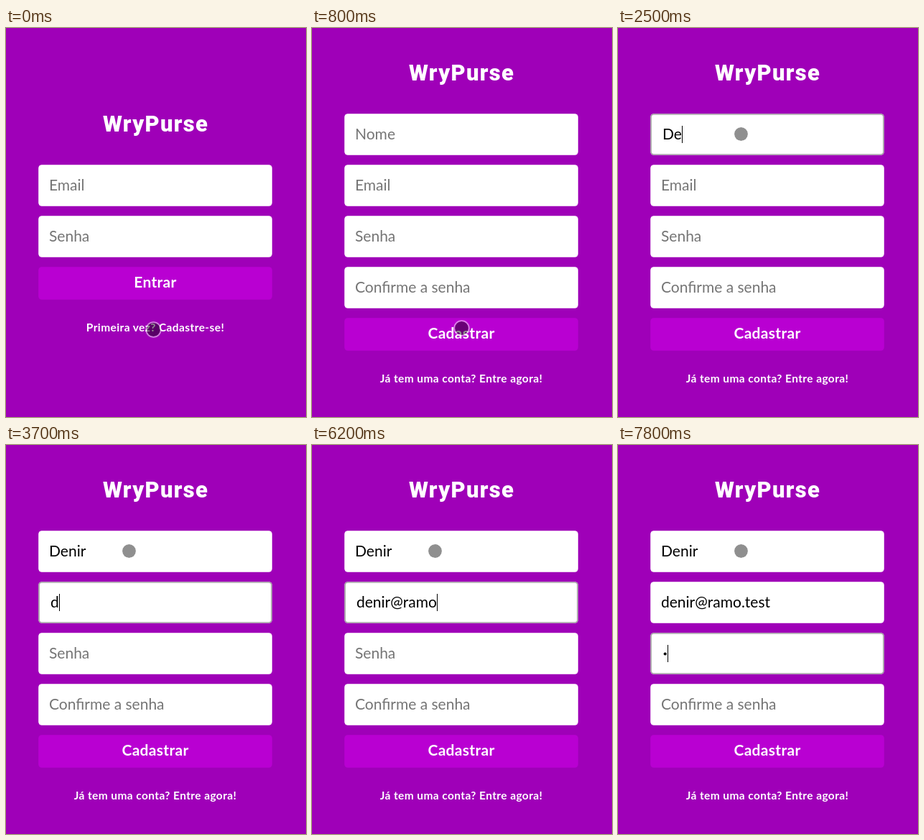
An HTML page that plays this animation: 418x541 px, repeating every 8 s.

```html
<!DOCTYPE html>
<html lang="pt">
<head>
<meta charset="utf-8">
<title>Cadastro</title>
<style>
  html, body { margin: 0; width: 100%; height: 100%; overflow: hidden; background: #9f00b8; }
  svg { display: block; width: 418px; height: 541px; }
  text { font-family: Lato, sans-serif; white-space: pre; }
  .field { font-size: 21px; }
  .button, .link, .brand { fill: #fff; text-anchor: middle; font-weight: 700; }
  .button { font-size: 21px; letter-spacing: .3px; }
  .link { font-size: 15.5px; letter-spacing: .4px; }
  .brand { font: 900 31px Roboto, sans-serif; letter-spacing: 1.3px; }
</style>
</head>
<body>
<svg id="stage" viewBox="0 0 418 541"></svg>
<script>
const LOOP = 8000, STEP = 100;
const LEFT = 45, WIDTH = 326, PITCH = 71, MIDDLE = 208;
const stage = document.getElementById('stage');

function add(parent, tag, attrs, content = '') {
  const node = document.createElementNS('http://www.w3.org/2000/svg', tag);
  set(node, attrs);
  node.textContent = content;
  parent.appendChild(node);
  return node;
}

function set(node, attrs) {
  for (const key in attrs) node.setAttribute(key, attrs[key]);
}

function show(node, visible) {
  node.setAttribute('visibility', visible ? 'inherit' : 'hidden');
}

// Rounded box pulled in from its outer edge on all sides.
function addBox(parent, y, height, inset, attrs) {
  return add(parent, 'rect', {
    x: LEFT + inset, y: y + inset, width: WIDTH - 2 * inset, height: height - 2 * inset,
    rx: 5 - inset, ...attrs
  });
}

function addField(page, y, label) {
  addBox(page, y, 58, .2, { fill: '#fff' });
  const border = addBox(page, y, 58, 1, {
    fill: 'none', stroke: '#a5a0a6', 'stroke-width': 1.7, visibility: 'hidden'
  });
  const text = add(page, 'text', { class: 'field', y: y + 36 });
  return { y, label, border, text };
}

function addPage(top, labels, action, link) {
  const page = add(stage, 'g', {});
  add(page, 'text', { class: 'brand', x: MIDDLE + .6, y: top - 46 }, 'WryPurse');
  const fields = labels.map((label, i) => addField(page, top + i * PITCH, label));
  const y = top + labels.length * PITCH;
  addBox(page, y, 46, .2, { fill: '#b900d2' });
  add(page, 'text', { class: 'button', x: MIDDLE, y: y + 29 }, action);
  add(page, 'text', { class: 'link', x: MIDDLE, y: y + 90 }, link);
  return { page, fields };
}

add(stage, 'rect', { width: 418, height: 541, fill: '#9f00b8' });
const login = addPage(190, ['Email', 'Senha'], 'Entrar', 'Primeira vez? Cadastre-se!');
const signup = addPage(119, ['Nome', 'Email', 'Senha', 'Confirme a senha'],
  'Cadastrar', 'Já tem uma conta? Entre agora!');

const caret = add(stage, 'rect', { width: 1, height: 24, fill: '#000' });
const secret = add(stage, 'circle', { cx: 65.7, cy: 290.5, r: 2.1, fill: '#000' });
const pointer = add(stage, 'g', {});
add(pointer, 'circle', { r: 9.5, fill: '#000', 'fill-opacity': .44 });
add(pointer, 'circle', { r: 10.3, fill: 'none', stroke: '#fff', 'stroke-width': 1.8, 'stroke-opacity': .5 });

const SIGNUP_AT = 800, SECRET_AT = 7800;
const focusTimes = [1600, 3200, 7200];
const bursts = [
  { field: 0, text: 'Denir', start: 2200, pace: 225 },
  { field: 1, text: 'denir@', start: 3700, pace: 200 },
  { field: 1, text: 'ramo.test', start: 5390, pace: 210 }
];
const home = { x: 205.5, y: 419.5 };
const glides = [
  { start: 0, end: 200, x: 208.5, y: 417.5 },
  { start: 800, end: 900, x: 185.5, y: 311.5 },
  { start: 1000, end: 1400, x: 171.5, y: 147.5 }
];

// Keys fall at an even pace within each burst.
function typedText(index, t) {
  return bursts.filter(burst => burst.field === index)
    .map(({ text, start, pace }) => text.slice(0, Math.max(0, Math.floor((t - start) / pace) + 1)))
    .join('');
}

function pointerAt(t) {
  return glides.reduce((from, to) => {
    const k = Math.min(1, Math.max(0, (t - to.start) / (to.end - to.start)));
    const eased = 1 - (1 - k) ** 2;
    return { x: from.x + (to.x - from.x) * eased, y: from.y + (to.y - from.y) * eased };
  }, home);
}

function renderField(field, typed, focused, masked) {
  const x = LEFT + (focused ? 17 : 15);
  field.text.textContent = masked ? '' : typed || field.label;
  set(field.text, { x, fill: typed ? '#000' : '#757575' });
  show(field.border, focused);
  if (!focused) return;
  const advance = masked ? 7 : typed ? field.text.getComputedTextLength() : 0;
  set(caret, { x: Math.round(x + advance), y: field.y + 17 });
}

function render(t) {
  const onSignup = t >= SIGNUP_AT;
  show(login.page, !onSignup);
  show(signup.page, onSignup);

  const active = focusTimes.filter(time => t >= time).length - 1;
  const hasSecret = t >= SECRET_AT;
  login.fields.forEach(field => renderField(field, '', false, false));
  signup.fields.forEach((field, i) =>
    renderField(field, typedText(i, t), i === active, i === 2 && hasSecret));
  show(caret, active >= 0);
  show(secret, hasSecret);

  const { x, y } = pointerAt(t);
  set(pointer, { transform: `translate(${x} ${y})` });
}

const begin = performance.now();
function tick() {
  const t = (performance.now() - begin) % LOOP;
  render(Math.floor(t / STEP) * STEP);
  requestAnimationFrame(tick);
}
tick();
</script>
</body>
</html>
```
